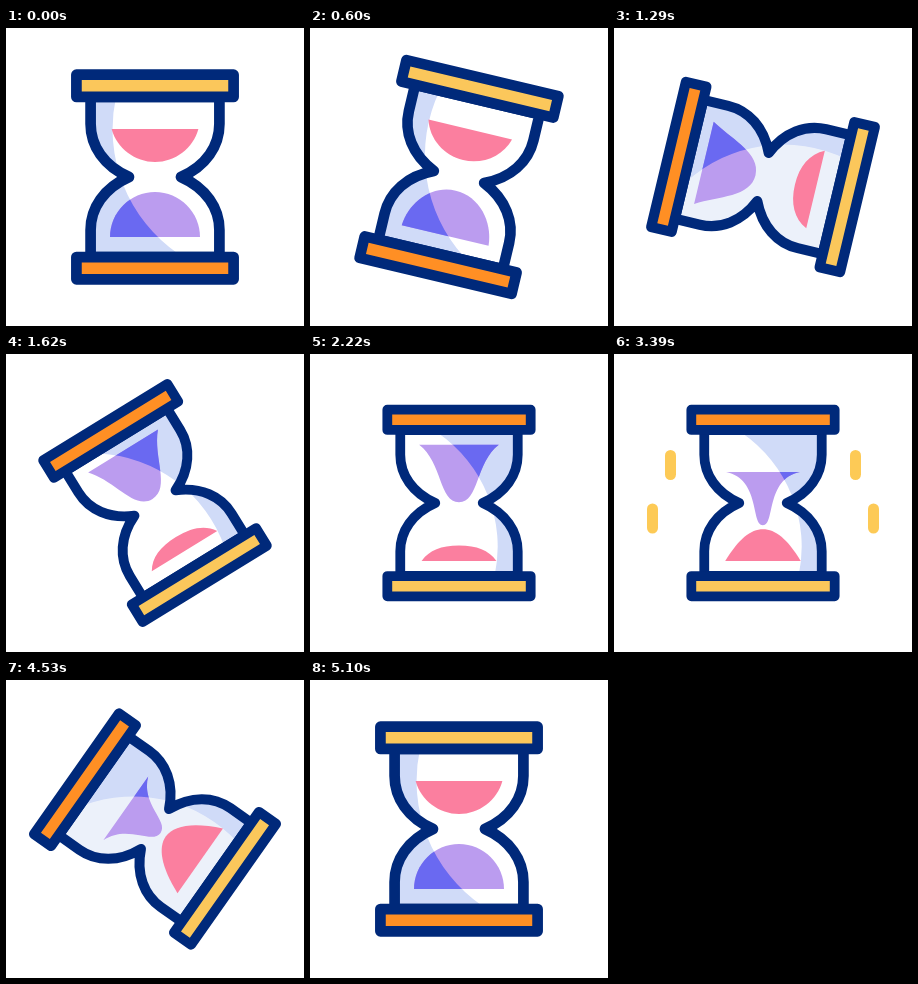
Recreate the animation shown at these times as an HTML page. Size 298 px wide and 298 px high, loop 5400 ms.

```html
<!DOCTYPE html>
<html lang="en">
<head>
<meta charset="utf-8">
<title>Hourglass</title>
<style>
  html, body { margin: 0; width: 100%; height: 100%; overflow: hidden; background: #fff; }
  svg { display: block; width: 100vw; height: 100vh; }
  .line { stroke: #00297a; stroke-width: 10.7; stroke-linejoin: round; stroke-linecap: round; }
  .tick { stroke: #fdca56; stroke-width: 11; stroke-linecap: round; fill: none; }
</style>
</head>
<body>
<svg viewBox="0 0 298 298">
  <defs>
    <path id="glass" d="M-64.4-80V-53C-64.4-31-51-11-26 0C-51 11-64.4 31-64.4 53V80H64.4V53C64.4 31 51 11 26 0C51-11 64.4-31 64.4-53V-80Z"/>
    <path id="shade" d="M-39-80A151.5 151.5 0 0 0 23.4 77V84H-80V-80Z"/>
    <clipPath id="inGlass"><use href="#glass"/></clipPath>
    <clipPath id="inShade"><use href="#shade"/></clipPath>
  </defs>
  <g id="ticks"></g>
  <g id="body">
    <use id="back" href="#glass"/>
    <g clip-path="url(#inGlass)">
      <use href="#shade" fill="#d0dbf8"/>
      <path id="pink" fill="#fb7f9f"/>
      <path id="violet" fill="#bb9cef"/>
      <g clip-path="url(#inShade)"><path id="deep" fill="#6a69f1"/></g>
    </g>
    <use href="#glass" class="line" fill="none"/>
    <rect class="line" x="-78.6" y="-102.3" width="157.2" height="22.2" fill="#fbc75b"/>
    <rect class="line" x="-78.6" y="80.1" width="157.2" height="22.2" fill="#ff8f24"/>
  </g>
</svg>
<script>
const LOOP = 5400, STEP = 30, MID = 149;
const FLIP = 300, POUR = 2100, POURED = 3600, BACK = 4200, HOME = 5100;

const $ = id => document.getElementById(id);
const clamp = x => Math.min(1, Math.max(0, x));
const span = (t, a, b) => clamp((t - a) / (b - a));
const ease = x => x * x * (3 - 2 * x);
const mix = (a, b, k) => a + (b - a) * k;

// Heap: half width, flat level and tip level, then handles as fractions:
// corner handle across and down, tip handle across
const violet = {
  rest:  [45, 60, 15, 1, 0.55, 0.55],
  full:  [44, 67, 3, 0.45, 0.33, 0.52],
  empty: [40, 28.5, -17, 0, 0.1, 0.3]
};
const pink = {
  rest:  [43.4, -48, -15, 0.88, 0.59, 0.46],
  full:  [41, -63.5, -49, 0.8, 0.7, 0.5],
  empty: [41.5, -63.7, -13.5, 0.62, 0.7, 0.3]
};

function heap({ rest, full, empty }, t) {
  const d = span(t, POUR, POURED);
  const blend = (a, b, k) => a.map((v, i) => mix(v, b[i], k));
  const [w, flat, level, across, down, round] =
    t < POUR ? blend(rest, full, ease(span(t, FLIP, POUR))) :
    t < BACK ? blend(full, empty, d) :
    blend(empty, rest, ease(span(t, BACK, HOME)));
  // While pouring, tips hang lower than a straight blend
  const tip = level - 28 * d * Math.sin(Math.PI * d);
  const hx = w * across, hy = mix(flat, tip, down), tx = w * round;
  return `M${-w} ${flat}C${-hx} ${hy} ${-tx} ${tip} 0 ${tip}` +
    `C${tx} ${tip} ${hx} ${hy} ${w} ${flat}Z`;
}

// Two rows of dashes mirrored about the middle
const ticks = [];
for (const row of [0, 1]) {
  for (const side of [-1, 1]) {
    const el = document.createElementNS("http://www.w3.org/2000/svg", "path");
    el.setAttribute("class", "tick");
    $("ticks").append(el);
    ticks.push({ el, x: MID + side * (92.5 + 18 * row), y: 101.5 + 53.5 * row });
  }
}

function draw(t) {
  const turn = ease(span(t, FLIP, POUR)) - ease(span(t, BACK, HOME));
  const angle = 180 * turn;
  $("body").setAttribute("transform",
    `translate(${MID} ${MID}) rotate(${angle}) scale(${mix(1, 0.912, turn)})`);

  // Glass tints slightly while lying on its side
  const tint = clamp((52 - Math.abs(angle - 90)) / 14);
  const [r, g, b] = [236, 241, 250].map(c => mix(255, c, tint));
  $("back").setAttribute("fill", `rgb(${r},${g},${b})`);

  const sand = heap(violet, t);
  $("violet").setAttribute("d", sand);
  $("deep").setAttribute("d", sand);
  $("pink").setAttribute("d", heap(pink, t));

  const head = ease(span(t, 3000, 3300)), tail = ease(span(t, 3900, 4200));
  for (const { el, x, y } of ticks) {
    el.setAttribute("d", head > tail ? `M${x} ${y + 19 * tail}V${y + 19 * head}` : "");
  }
}

const start = performance.now();
function tick() {
  const t = Math.max(0, performance.now() - start) % LOOP;
  draw(Math.floor(t / STEP) * STEP);
  requestAnimationFrame(tick);
}
tick();
</script>
</body>
</html>
```
